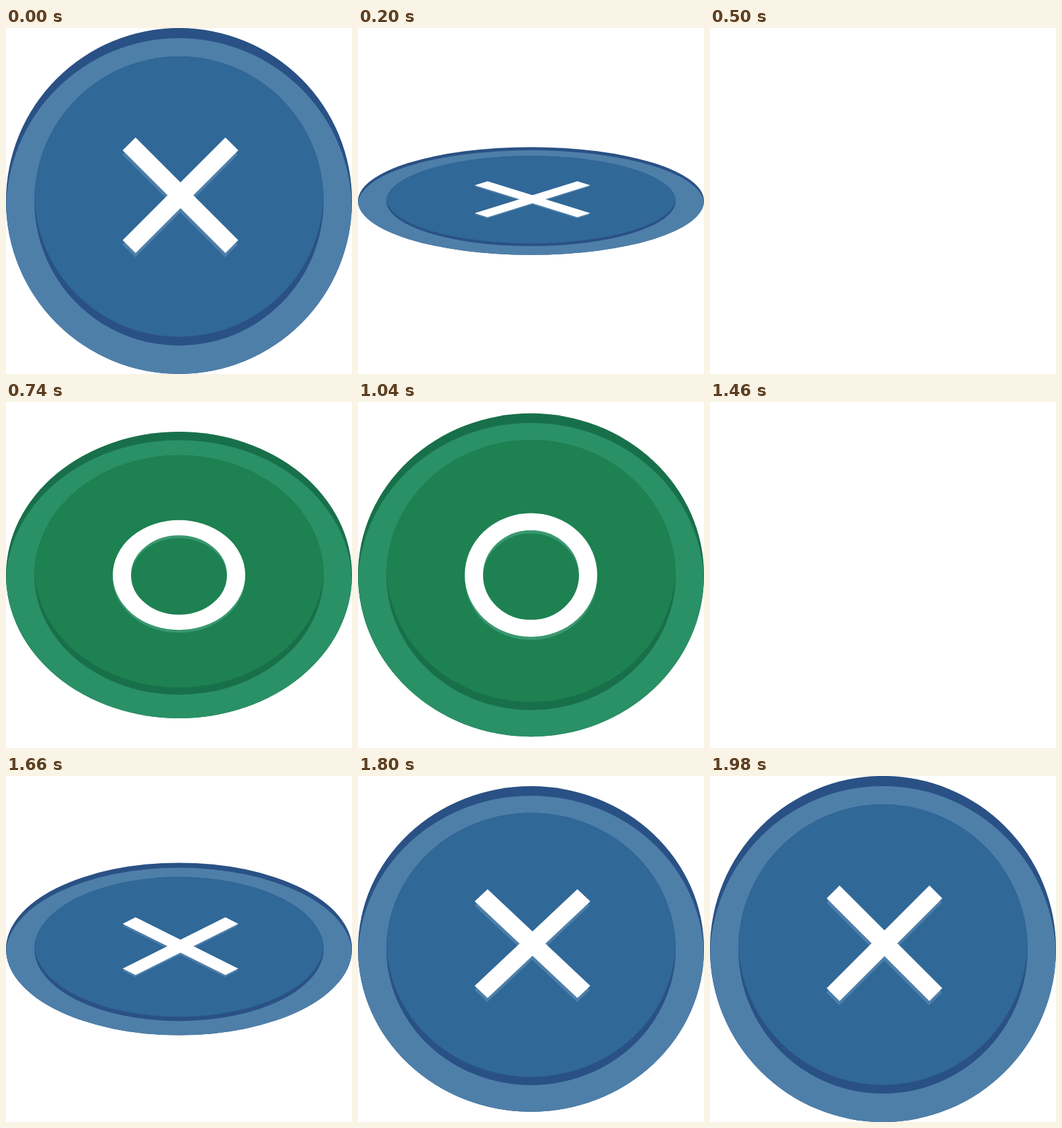
These frames come from a looping animation (512x512 px, 2 s). An HTML page with a canvas:

```html
<!DOCTYPE html>
<html lang="en">
<head>
<meta charset="utf-8">
<title>Flipping button</title>
<style>
  html, body { margin: 0; height: 100%; overflow: hidden; background: #fff; }
  canvas { display: block; width: 512px; height: 512px; }
</style>
</head>
<body>
<canvas id="stage" width="512" height="512"></canvas>
<script>
const ctx = document.getElementById('stage').getContext('2d');
const LOOP = 2000, HALF = 500, MID = 256;
const BLUE = { dark: '#2a5185', rim: '#4e7fa9', face: '#306898', shade: '#4e7fa9', mark: drawCross };
const GREEN = { dark: '#18704a', rim: '#2a9066', face: '#1e8151', shade: '#3a9870', mark: drawRing };

// Progress of a half flip: [ms, amount], joined by smooth cubics
const CURVE = [[0, 0], [40, .064], [80, .152], [160, .494], [220, .773],
               [240, .826], [300, .94], [400, .995], [500, 1]];

function slope(i) {
  if (i === 0 || i === CURVE.length - 1) return 0;
  const [a, b] = [CURVE[i - 1], CURVE[i + 1]];
  return (b[1] - a[1]) / (b[0] - a[0]);
}

function ease(ms) {
  const i = Math.max(1, CURVE.findIndex(p => p[0] >= ms));
  const [x0, y0] = CURVE[i - 1], [x1, y1] = CURVE[i];
  const w = x1 - x0, u = (ms - x0) / w, v = 1 - u;
  return y0 * v * v * (1 + 2 * u) + y1 * u * u * (3 - 2 * u)
    + w * u * v * (slope(i - 1) * v - slope(i) * u);
}

function circle(y, r) {
  ctx.beginPath();
  ctx.arc(MID, y, r, 0, Math.PI * 2);
}

// A disc with a second disc of the same size, shifted vertically and kept inside it
function bevel(r, shift, under, over) {
  ctx.save();
  circle(MID, r);
  ctx.fillStyle = under;
  ctx.fill();
  ctx.clip();
  circle(MID + shift, r);
  ctx.fillStyle = over;
  ctx.fill();
  ctx.restore();
}

function drawCross(dx, dy) {
  const x = 258.2 + dx, y = 247.5 + dy, d = 76;
  ctx.beginPath();
  ctx.moveTo(x - d, y - d);
  ctx.lineTo(x + d, y + d);
  ctx.moveTo(x + d, y - d);
  ctx.lineTo(x - d, y + d);
}

function drawRing(dx, dy) {
  circle(MID + dy * .8, 84.5);
}

function drawButton(look, scale) {
  ctx.setTransform(1, 0, 0, scale, 0, MID * (1 - scale));
  bevel(256, 15, look.dark, look.rim);
  bevel(214, -13, look.dark, look.face);
  ctx.lineWidth = 27;
  for (const [color, dx, dy] of [[look.shade, -.5, 6.3], ['#fff', 0, 0]]) {
    look.mark(dx, dy);
    ctx.strokeStyle = color;
    ctx.stroke();
  }
}

function frame(now) {
  const t = now % LOOP, part = Math.floor(t / HALF), p = ease(t % HALF);
  const scale = part % 2 ? p : 1 - p;
  ctx.setTransform(1, 0, 0, 1, 0, 0);
  ctx.clearRect(0, 0, 512, 512);
  if (scale > .002) drawButton(part === 1 || part === 2 ? GREEN : BLUE, scale);
}

const start = performance.now();
function tick() {
  frame(performance.now() - start);
  requestAnimationFrame(tick);
}
tick();
</script>
</body>
</html>
```
